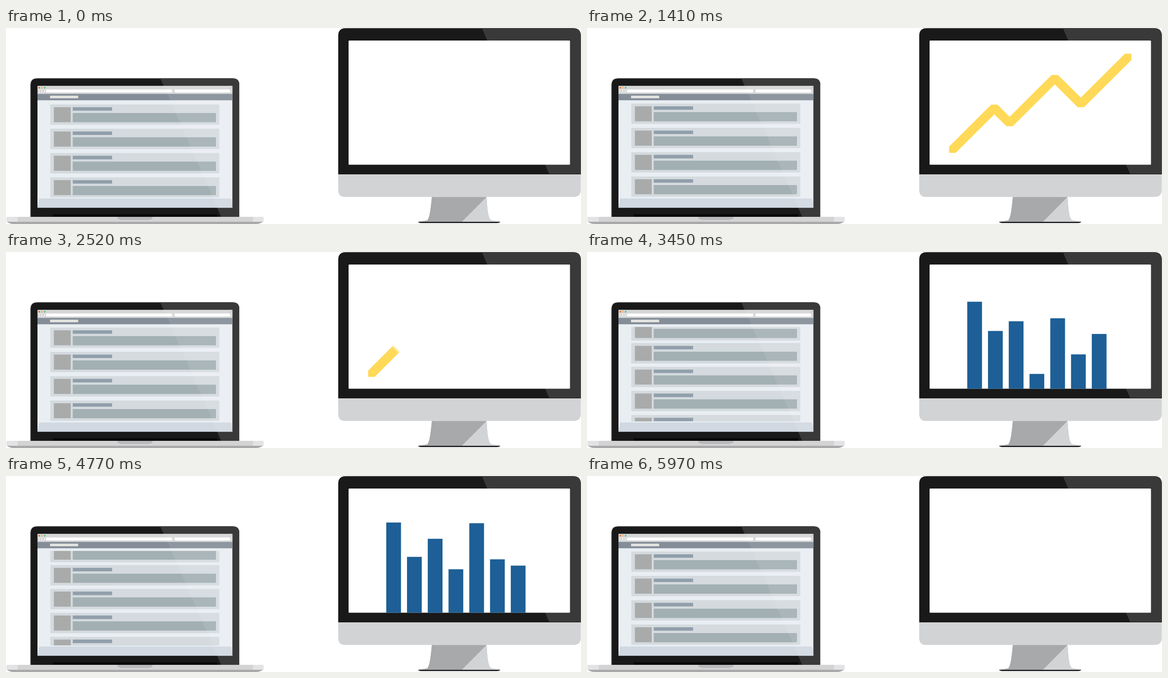
An HTML page that plays this animation: 1279x438 px, repeating every 6.27 s.

```html
<!DOCTYPE html>
<html lang="en">
<head>
<meta charset="utf-8">
<title>Feed and charts</title>
<style>
  html, body { margin: 0; width: 100%; height: 100%; overflow: hidden; background: #fff; }
  svg { display: block; width: 100%; height: 100%; }
</style>
</head>
<body>
<svg viewBox="0 0 1279 438">
  <defs>
    <clipPath id="feedClip"><rect x="70" y="167.5" width="434" height="211"/></clipPath>
    <clipPath id="lidClip"><path d="M54.5 422V127Q54.5 112.5 69 112.5H504.500Q519 112.500 519 127V422Z"/></clipPath>
    <clipPath id="bezelClip"><path d="M739 327V17Q739 .5 755.500 .5H1262Q1278.500 .5 1278.500 17V327Z"/></clipPath>
    <filter id="soft" filterUnits="userSpaceOnUse" x="740" y="0" width="539" height="438"><feGaussianBlur stdDeviation="2.5"/></filter>
    <mask id="wipe" maskUnits="userSpaceOnUse" x="762" y="28" width="493" height="278">
      <path id="trail" d="M800 284L906 178L940 212L1040 112L1098 170L1216 52" pathLength="1" fill="none" stroke="#fff" stroke-width="36" filter="url(#soft)"/>
    </mask>
    <g id="card">
      <path fill="#d4dade" d="M98.500 0H474.500V45.500H98.500Z"/>
      <path fill="#a9abaa" d="M106.500 6.200H144V39.800H106.500Z"/>
      <path fill="#919fab" d="M148.500 6.200H236V14H148.500Z"/>
      <path fill="#a3b0b3" d="M148.500 19.200H467V39.800H148.500Z"/>
    </g>
  </defs>

  <!-- laptop -->
  <g clip-path="url(#lidClip)">
    <path fill="#191919" d="M54 112H520V423H54Z"/>
    <path fill="#393939" d="M343 112H520V423H479Z"/>
    <path fill="#0a0a0a" d="M104 416H470V423H104Z"/>
  </g>
  <path d="M55 422V127Q55 113 69 113H504.500Q518.500 113 518.500 127V422" fill="none" stroke="#484848"/>
  <path fill="#e9eef3" d="M70 129.500H503.500V401.500H70Z"/>
  <path fill="#d6d6d6" d="M70 129.500H503.500V147.500H70Z"/>
  <circle cx="74" cy="133.500" r="2" fill="#ee6a5f"/>
  <circle cx="80" cy="133.500" r="2" fill="#f5bd4f"/>
  <circle cx="86" cy="133.500" r="2" fill="#3ecf8e"/>
  <path fill="#e9e9e9" d="M73 137.500H87V144H73Z"/>
  <path fill="none" stroke="#888" stroke-width=".8" d="M77.500 139.500L75.500 140.800L77.500 142M81.500 139.500L83.500 140.800L81.500 142M498 136L502 132"/>
  <rect x="89" y="137.500" width="280.500" height="6.500" rx="1" fill="#fff"/>
  <rect x="374.500" y="137.500" width="124.500" height="6.500" rx="3.200" fill="#fff"/>
  <path fill="#848d98" d="M70 147.200H503.500V161.500H70Z"/>
  <path fill="#e4e5e1" d="M98 151.200H160.500V157H98Z"/>
  <g id="feed" clip-path="url(#feedClip)"></g>
  <path fill="#d0d8e1" d="M74 381H501L503.500 401.500H70Z"/>
  <path fill="#fff" opacity=".08" d="M351 129.500H503.500V401.500H470Z"/>
  <path fill="#a9a9ab" d="M1 432H572.500Q566 438 556 438H18Q7 438 1 432Z"/>
  <path fill="#d3d3d4" d="M1 422H572.500V433H1Z"/>
  <path fill="#e2e3e4" d="M1 422H26V433H1ZM549.500 422H572.500V433H549.500Z"/>
  <path fill="#b9b9bb" d="M247.500 422H326V423Q325 429 316 429H258Q248 429 247.500 423Z"/>

  <!-- monitor -->
  <path fill="#d2d3d5" d="M739 326H1278.500V362Q1278.500 377.500 1263 377.500H754Q739 377.500 739 362Z"/>
  <g clip-path="url(#bezelClip)">
    <path fill="#191919" d="M738 0H1279V327H738Z"/>
    <path fill="#393939" d="M1058.500 0H1279V327H1208.500L1199 305.500L1070.500 28Z"/>
    <path fill="#111" d="M739 326H1279V327.500H739Z"/>
  </g>
  <rect x="762" y="28" width="492.500" height="277.500" rx="1.500" fill="#fff"/>
  <path fill="#a8a9ab" d="M947 377.500H1069Q1071 427 1079 429.500L1099 433H917L936 430Q943 428 947 377.500Z"/>
  <path fill="#d2d3d5" d="M1069 377.500Q1071 427 1079 429.500L1099 433H1014Z"/>
  <path fill="#252525" d="M916.500 433H1099.500Q1098 436 1092 436H924Q918 436 916.500 433Z"/>

  <path mask="url(#wipe)" fill="#ffd957" d="M805.500 265L899 171.300H913L940 198.500L1033.500 105H1047.500L1098.500 155.500L1196.500 57.500H1211V71.500L1105.500 177H1091.500L1040.500 126L947 219.500H933L906 193L820 279H805.500Z"/>
  <g id="bars" fill="#1d5f96"></g>
</svg>
<script>
const LOOP = 6270, STEP = 30, PITCH = 54.3, FEED_TOP = 168.800, BASE = 305.500;
const SCROLL_STARTS = [30, 1410, 3060, 4440];
// Feed offset per card at the scroll times below; upper cards lead.
const SCROLL_TIMES = [0, 225, 450, 540, 660, 930];
const SCROLL_POSES = [
  [-11, -8.600, -2.100],
  [-15, -8.600, -2.100],
  [-16.400, -8.600, -2.100],
  [-17, -8.600, -7],
  [-17, -14.700, -9]
];
const FIRST_TOPS = [58.500, 141.500, 114, 263.500, 105.500, 208, 150];
const SECOND_TOPS = [138.500, 210.500, 160.300, 166.500, 105.500, 124, 238.500];

const $ = id => document.getElementById(id);
const clamp = v => Math.min(1, Math.max(0, v));
const span = (t, from, to) => clamp((t - from) / (to - from));
const mix = (a, b, p) => a + (b - a) * p;
const smooth = p => p * p * (3 - 2 * p);
const wave = p => p - .8 * Math.sin(2 * Math.PI * p) / (2 * Math.PI);

function add(parent, tag, attrs) {
  const el = document.createElementNS('http://www.w3.org/2000/svg', tag);
  for (const key in attrs) el.setAttribute(key, attrs[key]);
  return parent.appendChild(el);
}

const cards = SCROLL_POSES.map(() => add($('feed'), 'use', { href: '#card' }));
const bars = FIRST_TOPS.map((_, i) => add($('bars'), 'rect', { x: 845.800 + 46.170 * i, width: 32.800 }));

function cardOffset(i, t) {
  if (t < SCROLL_STARTS[0]) return 2;
  const elapsed = t - SCROLL_STARTS.filter(s => s <= t).pop();
  const poses = [-PITCH, -31 - i, ...SCROLL_POSES[i], 0];
  const next = SCROLL_TIMES.findIndex(time => time > elapsed);
  if (next < 0) return 0;
  return mix(poses[next - 1], poses[next], span(elapsed, SCROLL_TIMES[next - 1], SCROLL_TIMES[next]));
}

function barHeight(i, t) {
  const grow = 1 - (1 - span(t, 3030, 4020)) ** 2.800;
  const morph = smooth(span(t, 4410, i === 5 ? 5490 : 5070));
  const shrink = 1 - span(t, 5760, 5970);
  return (BASE - mix(FIRST_TOPS[i], SECOND_TOPS[i], morph)) * grow * shrink;
}

function draw(now) {
  const t = Math.floor(now % LOOP / STEP) * STEP;
  cards.forEach((card, i) => card.setAttribute('y', FEED_TOP + PITCH * i + cardOffset(i, t)));

  const drawn = t < 1500 ? wave(span(t, 330, 1170)) : wave(1 - span(t, 1920, 2760));
  $('trail').setAttribute('stroke-dasharray', `${drawn} 2`);
  $('trail').setAttribute('visibility', drawn > 0 ? 'visible' : 'hidden');

  bars.forEach((bar, i) => {
    const height = barHeight(i, t);
    bar.setAttribute('y', BASE - height);
    bar.setAttribute('height', height);
  });
}

const start = performance.now();
function tick() {
  draw(performance.now() - start);
  requestAnimationFrame(tick);
}
tick();
</script>
</body>
</html>
```
